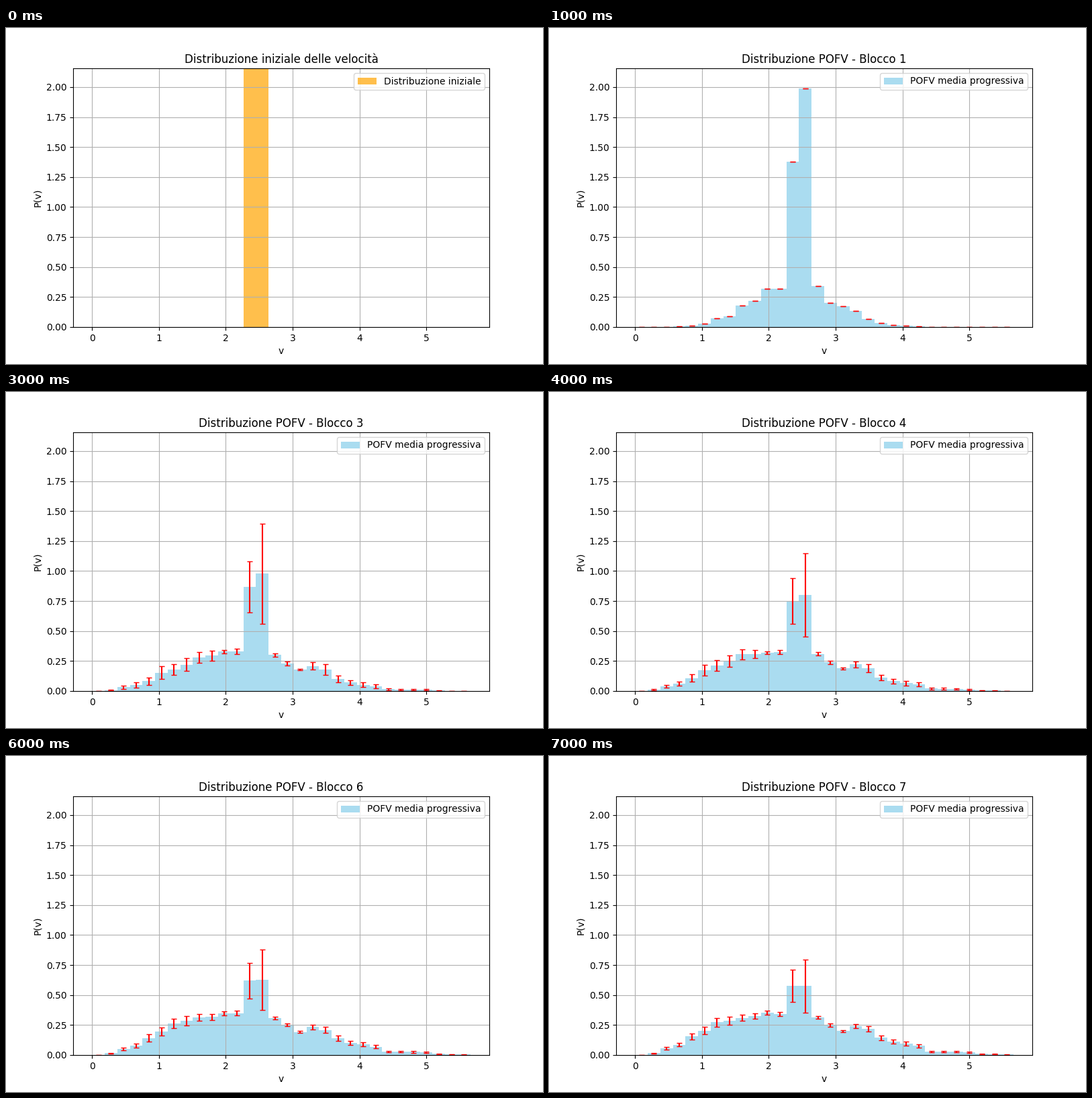
These frames come from a looping animation (800x500 px, 8000 ms). A matplotlib script:

```python
import numpy as np
import matplotlib.pyplot as plt
from matplotlib.animation import FuncAnimation

BINS = 30
BLOCKS = 7
V_MAX = 4 * np.sqrt(2)
Y_MAX = 2.1565
WIDTH = V_MAX / BINS
START = 12.5  # bin position of the initial speed
REACH = 5     # bins by which the speeds spread per block
JITTER = 0.12

# Relaxed distribution as key points (bin, P)
RELAXED = [(0, 0), (1, 0.026), (3, 0.14), (6, 0.35), (11, 0.355),
           (12, 0.29), (13, 0.29), (14, 0.31), (16, 0.235), (18, 0.27),
           (19, 0.175), (22, 0.107), (23, 0.047), (26, 0.048), (27, 0.02),
           (29, 0.008)]
# Remains of the initial peak: bin -> (height, decay per block)
PEAKS = {12: (1.1, 0.42), 13: (1.67, 0.18)}

bins = np.arange(BINS)
centers = (bins + 0.5) * WIDTH
relaxed = np.interp(bins, *zip(*RELAXED))
rng = np.random.default_rng(4)


def make_block(n):
    """Histogram of block n: spreading speeds plus the decaying peak."""
    spread = np.exp(-((bins - START) / (REACH * n)) ** 2)
    block = relaxed * spread * (1 + JITTER * rng.uniform(-1.7, 1.7, BINS))
    for k, (height, decay) in PEAKS.items():
        block[k] += height * decay ** (n - 1)
    return block


blocks = np.array([make_block(n) for n in range(1, BLOCKS + 1)])
initial = np.where(abs(bins - START) < 1, 1 / (2 * WIDTH), 0)

fig, ax = plt.subplots(figsize=(8, 5), dpi=100)


def draw(n):
    ax.clear()
    if n == 0:
        ax.bar(centers, initial, width=WIDTH, color="orange", alpha=0.7,
               label="Distribuzione iniziale")
        ax.set_title("Distribuzione iniziale delle velocità")
    else:
        mean = blocks[:n].mean(axis=0)
        error = blocks[:n].std(axis=0) / np.sqrt(n)
        ax.bar(centers, mean, width=WIDTH, yerr=error, color="skyblue",
               alpha=0.7, ecolor="red", capsize=3,
               label="POFV media progressiva")
        ax.set_title(f"Distribuzione POFV - Blocco {n}")
    ax.set_xlim(-0.05 * V_MAX, 1.05 * V_MAX)
    ax.set_ylim(0, Y_MAX)
    ax.set_xlabel("v")
    ax.set_ylabel("P(v)")
    ax.grid(True)
    ax.legend(loc="upper right")


anim = FuncAnimation(fig, draw, frames=BLOCKS + 1, interval=1000,
                     repeat=True)
plt.show()
```
